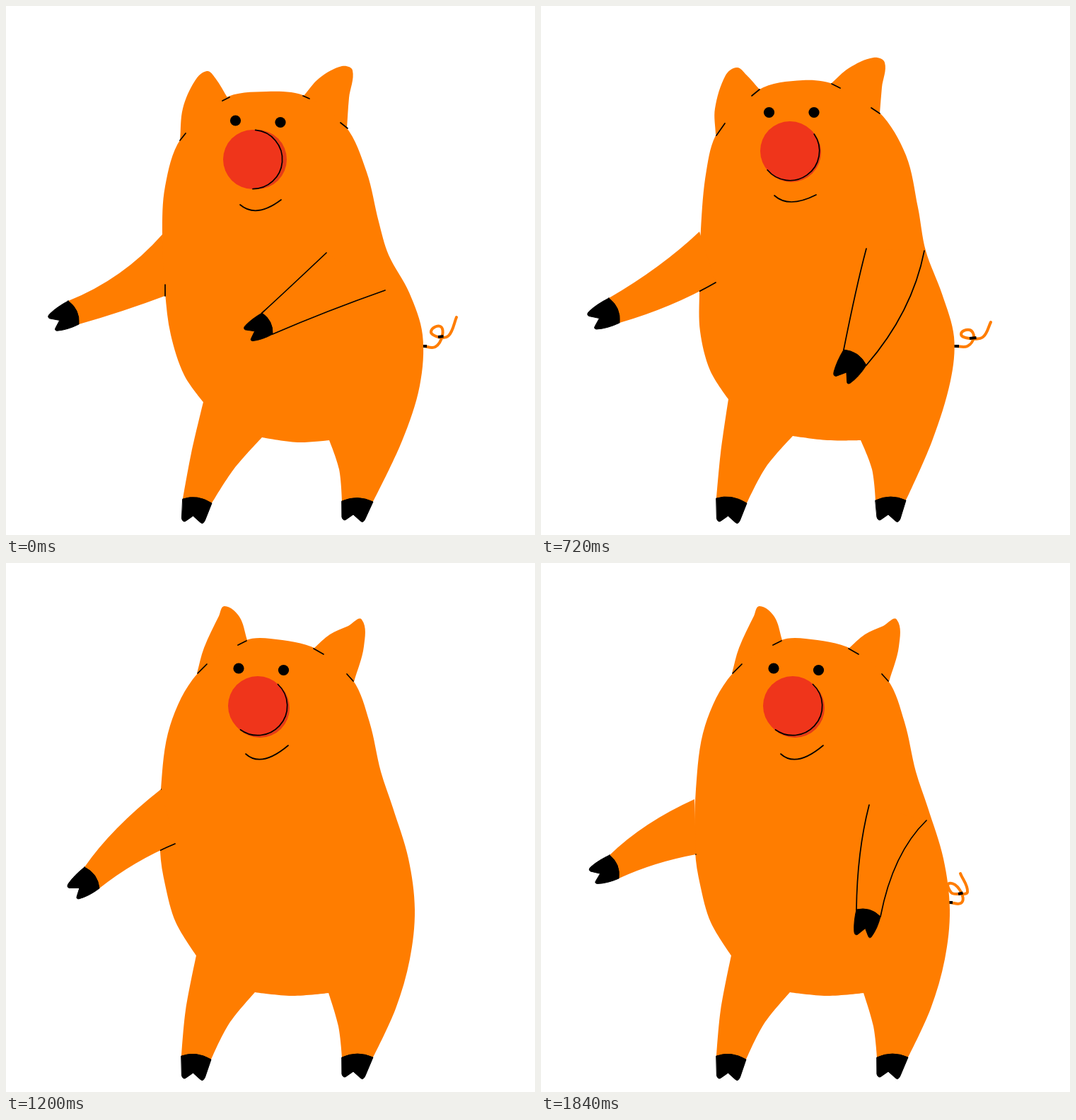
Recreate the animation shown at these times as an HTML page with a canvas. Size 748 by 748 pixels, loop 1920 ms.

```html
<!DOCTYPE html>
<html lang="en">
<head>
<meta charset="utf-8">
<title>Dancing pig</title>
<style>
html, body { margin: 0; width: 100%; height: 100%; overflow: hidden; background: #fff; }
canvas { display: block; width: 748px; height: 748px; }
</style>
</head>
<body>
<canvas id="stage" width="748" height="748"></canvas>
<script>
const ctx = document.getElementById('stage').getContext('2d');
const ORANGE = '#ff7d00', INK = '#000', RED = '#ef351b', RED_SIDE = '#e53b17';
const STEP = 80, COUNT = 24, BEAT = 8;

// Body poses over one sway. Outline runs clockwise from the left ankle.
// face: eyes, mouth, nose centre, nose depth, nose arc in degrees
const leanLow = {
  body: [250,697, 262,632, 279,560, 252,522, 233,465, 225,405, 221,323, 225,255, 247,188, 308,131,
    368,121, 425,128, 480,170, 510,235, 527,305, 541,352, 570,405, 589,465, 585,537, 560,615,
    519,701, 475,700, 471,655, 457,614, 412,617, 362,610, 322,655, 291,703],
  earL: [246,190, 250,145, 267,106, 284,92, 296,102, 314,131],
  earR: [421,127, 443,102, 475,85, 490,91, 485,130, 482,173],
  marks: [306,134, 316,129, 420,127, 429,131, 246,190, 254,180, 473,165, 483,173],
  face: [324.5,162, 388,164.5, 331,281, 357,289, 389,274, 349,217, 6,0, -85,90],
  side: [0]
};
const leanBack = {
  body: [248,696, 254,632, 265,556, 239,515, 225,460, 224,404, 226,316, 234,232, 250,178, 307,119,
    370,105, 418,112, 478,150, 516,211, 533,285, 544,346, 567,407, 584,468, 579,530, 553,615,
    516,699, 473,699, 468,655, 452,614, 405,614, 356,608, 318,652, 291,703],
  earL: [247,182, 246,145, 261,98, 277,87, 290,97, 309,118],
  earR: [411,109, 435,88, 470,73, 486,80, 482,115, 479,152],
  marks: [298,127, 309,118, 411,110, 423,116, 248,183, 260,166, 467,144, 479,152],
  face: [322.5,150.5, 386,150.5, 330,268, 355,277, 389,267, 352,205, 2,2, -35,140],
  side: [0]
};
const swingRight = {
  body: [239,699, 215,632, 191,553, 178,485, 178,440, 191,392, 217,338, 243,262, 267,180, 327,114,
    376,99, 430,97, 494,148, 528,218, 547,318, 545,365, 538,418, 520,500, 491,561, 504,632,
    511,695, 467,702, 446,655, 410,617, 355,619, 296,614, 288,655, 284,701],
  earL: [265,181, 253,143, 239,100, 251,84, 290,91, 327,115],
  earR: [422,97, 433,74, 441,46, 461,45, 484,88, 496,149],
  marks: [317,124, 327,115, 422,97, 434,100, 266,181, 274,167, 486,137, 495,148],
  face: [352,155.5, 416,142, 352,264, 383,275, 412,263, 398.5,204.5, 0.5,3.5, 15,193],
  side: [1]
};
const swingBack = {
  body: [237,698, 215,635, 196,545, 183,478, 182,425, 195,368, 224,308, 258,232, 293,138, 345,105,
    396,97, 457,108, 511,165, 532,240, 542,306, 541,365, 534,418, 524,480, 498,547, 508,625,
    512,694, 467,702, 446,657, 407,613, 350,618, 299,613, 288,655, 284,701],
  earL: [293,137, 291,118, 276,78, 287,68, 322,79, 348,104],
  earR: [458,110, 460,84, 471,70, 487,79, 510,122, 512,169],
  marks: [340,108, 349,104, 457,111, 466,118, 293,138, 308,125, 506,160, 512,169],
  face: [368.5,146.5, 432,146, 359,258, 385,274.5, 414,268, 398.5,203, -1,2, 38,210],
  side: [1]
};
const leanIn = {
  body: [248,697, 254,632, 269,555, 240,508, 225,455, 218,408, 219,320, 232,230, 271,156, 338,110,
    374,107, 440,122, 490,165, 514,225, 530,295, 547,346, 569,418, 578,490, 571,560, 551,630,
    519,699, 475,699, 470,655, 456,608, 404,612, 352,607, 315,652, 290,702],
  earL: [270,156, 280,120, 301,75, 309,61, 330,76, 341,109],
  earR: [435,121, 458,101, 484,89, 503,80, 506,118, 492,168],
  marks: [328,116, 340,110, 435,121, 449,129, 271,156, 284,143, 482,157, 491,167],
  face: [329,149, 392.5,151.5, 339,270, 365,277, 399,258, 356,202, 3,3, -47,126],
  side: [0]
};
const sway = { 0: leanLow, 1: leanBack, 3: swingRight, 5: swingBack, 7: leanIn };
const bob = { 2: -20, 4: 10, 6: -16 };

// Arms: shoulder, edge middle, wrist, then wrist, edge middle, shoulder.
const L = {
  low: [221,323, 160,378, 88,417, 103,450, 165,431, 230,408],
  wide: [224,319, 165,368, 96,413, 111,448, 182,423, 247,391],
  bent: [219,320, 157,375, 111,430, 132,460, 183,425, 239,397],
  high: [217,334, 151,370, 97,413, 110,446, 162,426, 219,412],
  front: [218,392, 240,440, 248,509, 286,508, 294,430, 280,349],
  cross: [221,402, 307,433, 380,464, 395,434, 357,398, 304,349],
  back: [215,360, 244,430, 297,508, 329,486, 312,405, 297,343],
  hidden: [250,330, 265,380, 270,440, 305,440, 310,390, 290,340]
};
const R = {
  cross: [453,349, 403,396, 362,434, 377,464, 455,432, 536,402],
  back: [460,343, 445,405, 428,486, 460,508, 513,430, 542,346],
  front: [464,342, 451,412, 446,490, 480,500, 505,421, 545,364],
  low: [528,412, 568,435, 598,468, 624,445, 580,375, 542,306],
  wide: [538,412, 584,440, 628,468, 653,441, 602,381, 547,319],
  far: [538,412, 590,442, 642,470, 667,443, 608,383, 547,319],
  bent: [539,422, 582,447, 620,481, 646,448, 598,384, 547,323],
  hidden: [480,400, 480,440, 480,480, 512,480, 515,430, 520,380]
};
const armL = { 0: L.low, 1: L.wide, 3: L.hidden, 5: L.hidden, 7: L.bent, 8: L.wide, 9: L.wide,
  11: L.front, 12: L.cross, 13: L.back, 15: L.bent, 16: L.low, 17: L.wide,
  19: L.front, 20: L.cross, 21: L.back, 23: L.high };
const armR = { 0: R.cross, 1: R.back, 3: R.low, 5: R.low, 7: R.front, 8: R.cross, 9: R.back,
  11: R.wide, 12: R.far, 13: R.wide, 15: R.hidden, 17: R.hidden,
  19: R.bent, 20: R.wide, 21: R.bent, 23: R.front };
const armpit = { 0: [225,394, 225,402, 225,410], 19: [545,355, 543,390, 539,422] };

const T = {
  curl: [590,481, 607,482, 617,466, 614,453, 601,460, 611,468, 626,466, 637,440],
  flat: [586,481, 603,481, 612,468, 606,458, 594,464, 606,470, 625,468, 636,447],
  tight: [577,480, 595,480, 592,462, 577,453, 580,466, 590,468, 603,465, 593,439],
  hook: [185,474, 185,474, 190,462, 190,456, 190,462, 177,461, 173,456, 173,433],
  left: [180,474, 165,474, 172,460, 185,456, 185,464, 174,462, 161,462, 179,434],
  hidden: [380,474, 370,474, 372,460, 385,456, 385,464, 377,461, 365,462, 379,434]
};
const tail = { 0: T.curl, 1: T.flat, 3: T.hook, 4: T.left, 5: T.hidden, 7: T.tight, 8: T.curl, 9: T.flat,
  11: T.hook, 12: T.left, 13: T.hidden, 15: T.hidden, 16: T.tight, 17: T.flat,
  19: T.left, 20: T.hook, 21: T.hidden, 23: T.tight };

const mix = (a, b, u) => a.map((v, i) => v + (b[i] - v) * u);

function at(keys, n, period, field) {
  const get = k => field ? keys[k][field] : keys[k];
  const list = Object.keys(keys).map(Number);
  const a = list.filter(k => k <= n).pop();
  const b = list.find(k => k > n);
  const end = b === undefined ? period : b;
  return mix(get(a), get(end % period), (n - a) / (end - a));
}

// Lifts or lowers the upper body, leaving the feet in place.
const bend = (p, lift, count = p.length) => p.map((v, i) =>
  i % 2 && i < count ? v + lift * Math.max(0, (620 - v) / 500) : v);

function spline(p, closed, sharp = () => 0) {
  const n = p.length / 2, path = new Path2D();
  const pt = i => {
    const k = closed ? (i + n) % n : Math.max(0, Math.min(n - 1, i));
    return [p[2 * k], p[2 * k + 1]];
  };
  const dir = i => {
    const [ax, ay] = pt(i - 1), [bx, by] = pt(i + 1);
    const k = (1 - sharp((i + n) % n)) / (Math.hypot(bx - ax, by - ay) || 1);
    return [(bx - ax) * k, (by - ay) * k];
  };
  path.moveTo(p[0], p[1]);
  for (let i = 0; i < (closed ? n : n - 1); i++) {
    const [ax, ay] = pt(i), [bx, by] = pt(i + 1), [ux, uy] = dir(i), [vx, vy] = dir(i + 1);
    const h = Math.hypot(bx - ax, by - ay) / 3;
    path.bezierCurveTo(ax + ux * h, ay + uy * h, bx - vx * h, by - vy * h, bx, by);
  }
  if (closed) path.closePath();
  return path;
}

// Curve from the current point (ax, ay) through a middle point.
function through(path, ax, ay, mx, my, bx, by) {
  path.quadraticCurveTo(2 * mx - (ax + bx) / 2, 2 * my - (ay + by) / 2, bx, by);
}

function curve(p) {
  const path = new Path2D();
  path.moveTo(p[0], p[1]);
  through(path, ...p);
  return path;
}

function fill(path, color) {
  ctx.fillStyle = color;
  ctx.fill(path);
}

function stroke(path, color = INK, width = 1.7) {
  ctx.strokeStyle = color;
  ctx.lineWidth = width;
  ctx.stroke(path);
}

function line(ax, ay, bx, by, width) {
  const path = new Path2D();
  path.moveTo(ax, ay);
  path.lineTo(bx, by);
  stroke(path, INK, width);
}

function disc(x, y, r, color) {
  const path = new Path2D();
  path.arc(x, y, r, 0, 7);
  fill(path, color);
}

function hand(px, py, qx, qy) {
  const ux = qx - px, uy = qy - py, mx = (px + qx) / 2, my = (py + qy) / 2;
  const loc = (x, y) => [mx + ux * x - uy * y, my + uy * x + ux * y];
  const path = new Path2D();
  path.moveTo(px, py);
  path.quadraticCurveTo(...loc(0, -0.28), qx, qy);
  path.quadraticCurveTo(...loc(0.52, 0.5), ...loc(0.38, 0.88));
  path.quadraticCurveTo(...loc(0.32, 0.98), ...loc(0.25, 0.88));
  path.lineTo(...loc(0.05, 0.62));
  path.lineTo(...loc(-0.18, 0.95));
  path.quadraticCurveTo(...loc(-0.28, 1.02), ...loc(-0.34, 0.86));
  path.quadraticCurveTo(...loc(-0.47, 0.5), px, py);
  path.closePath();
  fill(path, INK);
  stroke(path, INK, 1);
}

function arm(a, front, body) {
  const path = new Path2D();
  path.moveTo(a[0], a[1]);
  through(path, ...a.slice(0, 6));
  path.lineTo(a[6], a[7]);
  through(path, ...a.slice(6));
  fill(path, ORANGE);
  if (front) {
    ctx.save();
    ctx.clip(body);
    stroke(curve(a.slice(0, 6)));
    stroke(curve(a.slice(6)));
    ctx.restore();
  }
  hand(...a.slice(4, 8));
}

function foot(px, py, qx, qy, x, y) {
  const path = new Path2D();
  path.moveTo(px, py);
  path.quadraticCurveTo((px + qx) / 2, (py + qy) / 2 - 10, qx, qy);
  path.lineTo(x + 17, y + 6);
  path.quadraticCurveTo(x + 14, y + 13, x + 10, y + 9);
  path.lineTo(x, y);
  path.lineTo(x - 10, y + 7);
  path.quadraticCurveTo(x - 14, y + 10, x - 16, y + 4);
  path.closePath();
  fill(path, INK);
  stroke(path, INK, 1);
}

function drawTail(p) {
  stroke(spline(p, false), ORANGE, 4);
  ctx.lineCap = 'butt';
  line(p[0] - 2, p[1], p[0] + 5, p[1], 4);
  line(p[10], p[11], (p[10] + p[12]) / 2, (p[11] + p[13]) / 2, 4);
  ctx.lineCap = 'round';
}

function drawFace(f) {
  const [cx, cy, dx, dy, a0, a1] = f.slice(10), deg = Math.PI / 180;
  disc(f[0], f[1], 7.6, INK);
  disc(f[2], f[3], 7.6, INK);
  disc(cx + dx, cy + dy, 42, RED_SIDE);
  disc(cx, cy, 42, RED);
  const rim = new Path2D();
  rim.arc(cx, cy, 41.7, a0 * deg, a1 * deg);
  stroke(rim);
  stroke(curve(f.slice(4, 10)));
}

function draw(n) {
  const phase = n % BEAT, lift = bob[phase] || 0;
  const pose = (name, count) => bend(at(sway, phase, BEAT, name), lift, count);
  const part = keys => bend(at(keys, n, COUNT), lift);

  ctx.fillStyle = '#fff';
  ctx.fillRect(0, 0, 748, 748);
  ctx.lineCap = ctx.lineJoin = 'round';

  const b = pose('body'), side = at(sway, phase, BEAT, 'side')[0];
  const corners = [0, 20, 21, 23, 25, 27];
  const body = spline(b, true, i =>
    corners.includes(i) ? 1 : i === 2 ? 1 - side : i === 18 ? side : 0);
  const frontL = n > 6, frontR = n < 14 || n > 21;
  const left = part(armL), right = part(armR);

  drawTail(part(tail));
  if (!frontL) arm(left, false);
  if (!frontR) arm(right, false);
  fill(spline(pose('earL'), false), ORANGE);
  fill(spline(pose('earR'), false), ORANGE);
  fill(body, ORANGE);
  foot(b[0], b[1], b[54], b[55], 264.5, 721);
  foot(b[42], b[43], b[40], b[41], 491, 719);

  const m = pose('marks');
  for (let i = 0; i < m.length; i += 4) line(...m.slice(i, i + 4), 1.7);
  drawFace(pose('face', 12));
  if (frontL) arm(left, true, body);
  if (frontR) arm(right, true, body);
  if (armpit[n]) stroke(curve(armpit[n]));
}

const start = performance.now();
function tick() {
  draw(Math.floor((performance.now() - start) / STEP) % COUNT);
  requestAnimationFrame(tick);
}
tick();
</script>
</body>
</html>
```
